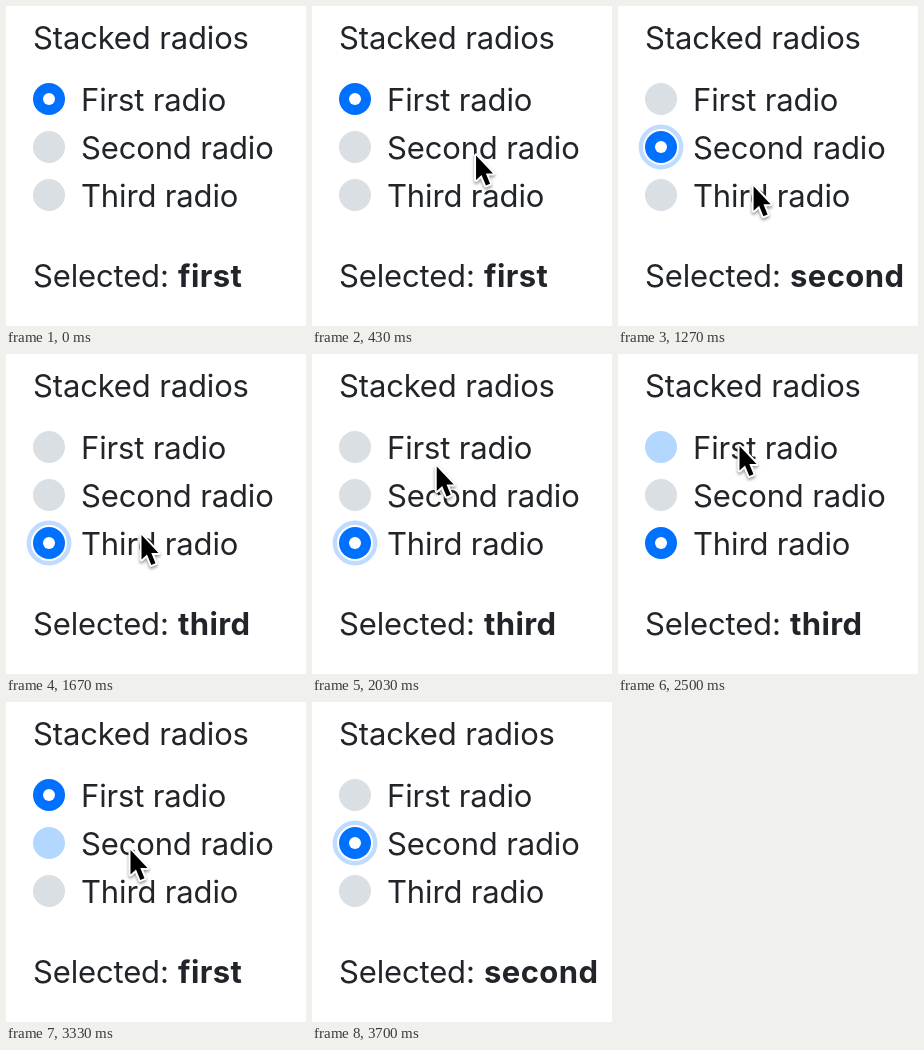
An HTML page for the animation above (4.67 s loop, 300 by 320 pixels).

```html
<!DOCTYPE html>
<html lang="en">
<head>
<meta charset="utf-8">
<title>Stacked radios</title>
<style>
  html, body { margin: 0; width: 100%; height: 100%; overflow: hidden; background: #fff; }
  svg { display: block; width: 300px; height: 320px; }
  text { font: 31px Inter, Roboto, sans-serif; letter-spacing: -.15px; fill: #212529; }
  .word { font-weight: 700; letter-spacing: .4px; }
  .disc { fill: #dadfe4; }
  .ring, .dot { display: none; }
  .ring { fill: none; stroke: #bfdbff; stroke-width: 4.4; }
  .dot { fill: #fff; }
  .pressed .disc { fill: #b3d7ff; }
  .checked .disc { fill: #0070ff; }
  .checked .dot, .focused .ring { display: inline; }
  #cursor path {
    fill: #000; stroke: #fff; stroke-width: 4; stroke-linejoin: round; paint-order: stroke;
    filter: drop-shadow(0 2px 1.5px rgba(0, 0, 0, .4));
  }
</style>
</head>
<body>
<svg viewBox="0 0 300 320">
  <text x="27" y="43">Stacked radios</text>
  <g id="radios"></g>
  <text x="27" y="281">Selected:</text>
  <text class="word" id="word" x="172" y="281">first</text>
  <g id="cursor"><path d="M.5 1V25.5L6 20.5L10.3 31L14.5 29.2L10.3 19H17.5Z"/></g>
</svg>
<script>
const LOOP = 4670;
const names = ['First', 'Second', 'Third'];

const smooth = u => u * u * (3 - 2 * u);
const easeOut = u => 1 - (1 - u) ** 1.6;

// Times below are in ticks of 1/30 s.
const clicks = [
  { down: 21, up: 24, radio: 1 },
  { down: 46, up: 50, radio: 2 },
  { down: 75, up: 80, radio: 0 },
  { down: 100, up: 106, radio: 1 },
];

// The pointer enters from the right, visits each radio and leaves again.
const entry = { x: 257, y: 154 };
const moves = [
  { start: 8, end: 16, x: 139, y: 147, ease: easeOut },
  { start: 28, end: 39, x: 135, y: 180, ease: smooth },
  { start: 52, end: 67, x: 121, y: 91, ease: easeOut },
  { start: 83, end: 91, x: 124, y: 147, ease: smooth },
  { start: 108, end: 111, x: 300, y: 160, ease: smooth },
];

const radios = document.getElementById('radios');
const word = document.getElementById('word');
const cursor = document.getElementById('cursor');

radios.innerHTML = names.map((name, i) => `
  <g transform="translate(0 ${48 * i})">
    <circle class="ring" cx="43" cy="93" r="20.2"/>
    <circle class="disc" cx="43" cy="93" r="16"/>
    <circle class="dot" cx="43" cy="93" r="6"/>
    <text x="75" y="105">${name} radio</text>
  </g>`).join('');

function drawRadios(tick) {
  const done = clicks.filter(c => tick >= c.up).pop();
  const held = clicks.find(c => tick >= c.down && tick < c.up);
  const selected = done ? done.radio : 0;
  [...radios.children].forEach((group, i) => {
    group.classList.toggle('checked', i === selected);
    group.classList.toggle('focused', i === selected && !!done && !held);
    group.classList.toggle('pressed', !!held && i === held.radio);
  });
  word.textContent = names[selected].toLowerCase();
}

function drawCursor(tick) {
  const visible = tick >= moves[0].start && tick < moves[moves.length - 1].end;
  cursor.style.display = visible ? '' : 'none';
  let { x, y } = entry;
  for (const move of moves) {
    const u = (tick - move.start) / (move.end - move.start);
    const k = move.ease(Math.min(1, Math.max(0, u)));
    x += (move.x - x) * k;
    y += (move.y - y) * k;
  }
  cursor.setAttribute('transform', `translate(${x} ${y})`);
}

function draw() {
  const time = performance.now() % LOOP;
  // Ticks begin on the nearest hundredth of a second.
  const tick = Math.floor((Math.floor(time / 10) + 0.5) * 0.3);
  drawRadios(tick);
  drawCursor(tick);
  requestAnimationFrame(draw);
}
draw();
</script>
</body>
</html>
```
